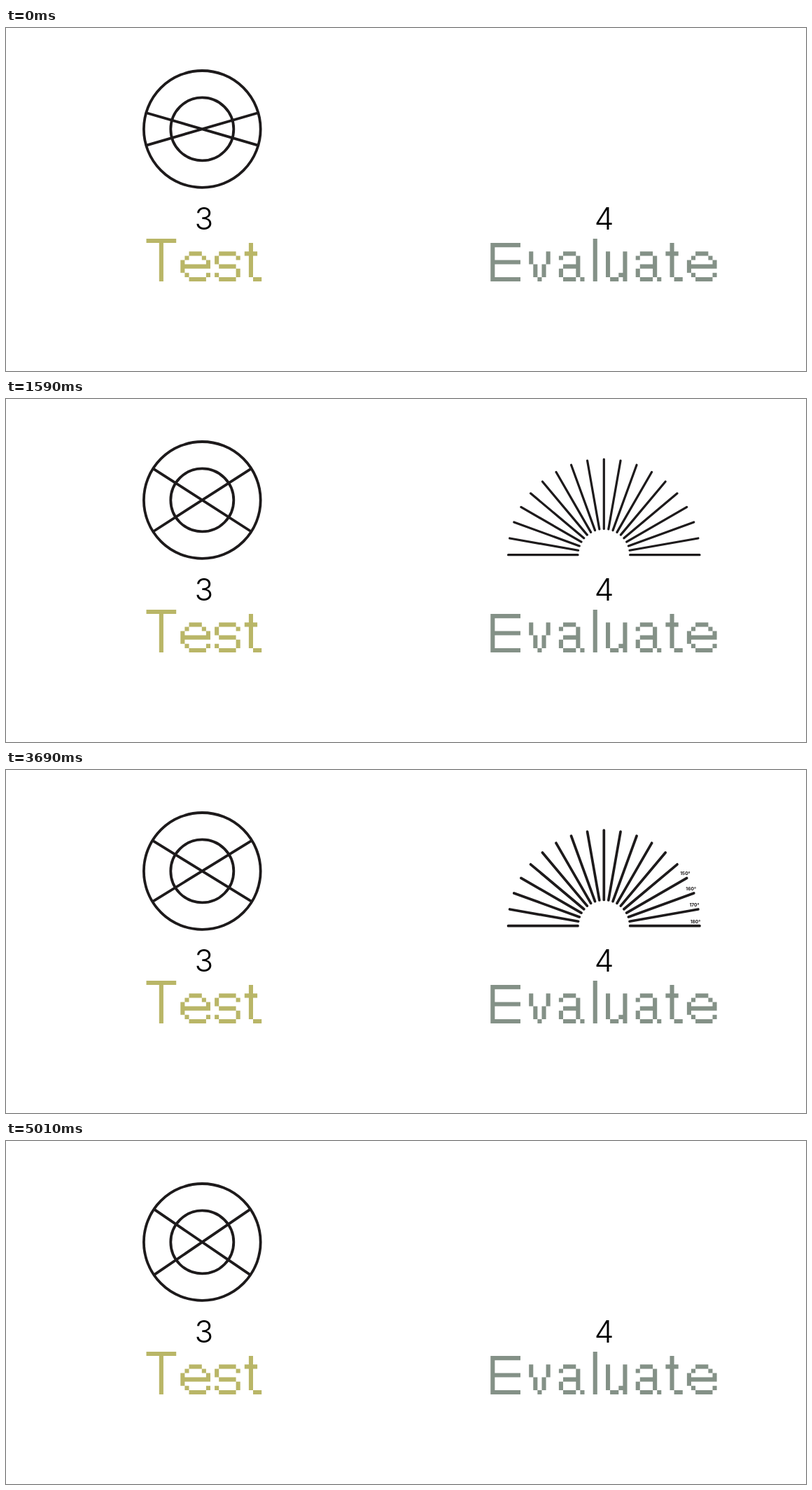
Write an HTML page that moves like this. It is 1143x490 px and loops after 5.13 s.

```html
<!DOCTYPE html>
<html lang="en">
<head>
<meta charset="utf-8">
<title>Test and Evaluate</title>
<style>
  html, body { margin: 0; width: 100%; height: 100%; overflow: hidden; background: #fff; }
  svg { display: block; width: 100%; height: 100%; }
  .ink { fill: none; stroke: #1d1a1b; stroke-width: 3.8; }
  .num { font: 300 44px Inter, "Liberation Sans", sans-serif; text-anchor: middle; fill: #000; }
  .deg { font: 700 6.6px Inter, "Open Sans", sans-serif; text-anchor: middle; fill: #1d1a1b; }
</style>
</head>
<body>
<svg id="stage" viewBox="0 0 1143 490">
  <g class="ink">
    <circle cx="280.3" cy="144.4" r="83.4"/>
    <circle cx="280.3" cy="144.4" r="45"/>
    <path id="cross"/>
  </g>
  <g id="rays" class="ink" stroke-linecap="round"></g>
  <g id="labels"></g>
  <text class="num" x="282.8" y="288">3</text>
  <text class="num" x="854.5" y="288">4</text>
</svg>
<script>
const LOOP = 5130, COUNT = 19, RAD = Math.PI / 180;
const $ = id => document.getElementById(id);

function add(parent, tag, attrs, text = '') {
  const el = document.createElementNS('http://www.w3.org/2000/svg', tag);
  for (const k in attrs) el.setAttribute(k, attrs[k]);
  el.textContent = text;
  parent.append(el);
  return el;
}

// Block letters: advance, then pen strokes through grid points written as xy.
const letters = {
  T: [8, '00 60, 30 39'],
  E: [9, '61 01 09 69, 05 65'],
  a: [8, '04 13 33 44 48 59, 46 16 07 08 19 39 48'],
  e: [8, '06 66 65 43 23 05 07 29 59 68'],
  l: [3, '00 09'],
  s: [7, '54 43 13 04 05 16 46 57 58 49 19 08'],
  t: [5, '11 18 29 39, 03 23'],
  u: [7, '03 08 19 29 38, 43 49'],
  v: [7, '03 05 16 18 29 38 36 45 43']
};

// Cells crossed by one stroke; every segment is straight or at 45 degrees.
function cells(stroke, pen) {
  const pts = stroke.split(' ').map(p => [+p[0], +p[1]]);
  let [x, y] = pts[0], d = '';
  const dot = () => { d += `M${pen + x} ${y}h1v1h-1z`; };
  dot();
  for (const [px, py] of pts) {
    while (x !== px || y !== py) {
      x += Math.sign(px - x);
      y += Math.sign(py - y);
      dot();
    }
  }
  return d;
}

function blockWord(word, x, color) {
  const g = add($('stage'), 'g', {
    transform: `translate(${x} 301) scale(6.1)`, fill: color,
    role: 'img', 'aria-label': word
  });
  let pen = 0, d = '';
  for (const ch of word) {
    const [advance, strokes] = letters[ch];
    for (const s of strokes.split(', ')) d += cells(s, pen);
    pen += advance;
    if (word.startsWith('t', word.indexOf(ch) + 1)) pen -= 1 * (ch === 'a');
  }
  add(g, 'path', { d });
}
// Kerned pair "at" sits one cell tighter.
function kern() {
  blockWord('Test', 200.5, '#b9b667');
  blockWord('Evalu', 692.3, '#849187');
  blockWord('a', 692.3 + 34 * 6.1, '#849187');
  blockWord('te', 692.3 + 41 * 6.1, '#849187');
}
kern();

const rays = [], labels = [];
for (let i = 0; i < COUNT; i++) {
  const c = -Math.cos(i * 10 * RAD), s = -Math.sin(i * 10 * RAD);
  const at = r => [854.3 + r * c, 222.7 + r * s];
  const [x1, y1] = at(37.3), [x2, y2] = at(136.7);
  rays.push(add($('rays'), 'line', { x1, y1, x2, y2 }));
  const shift = 2.5 - 8.5 * Math.max(0, c) ** 4;
  labels.push(add($('labels'), 'text',
    { class: 'deg', x: x2 + shift, y: y2 - 4 }, i * 10 + '°'));
}

const hold = (t, from, tick) => from + tick * Math.floor((t - from) / tick);

function sweep(t, t0, t1, a0, a1) {
  const p = Math.min(1, Math.max(0, (t - t0) / (t1 - t0)));
  return a0 + (a1 - a0) * p;
}

// Two steady turns of the crossed lines, in degrees.
function angleAt(t) {
  if (t >= 1830) return sweep(hold(t, 1830, 54), 1830, 4980, 50, 327.3);
  const q = t < 1170 ? hold(t, 120, 57) : hold(t, 1170, 140);
  return sweep(q, 120, 1590, 16.2, 147.3);
}

const show = (el, on) => el.setAttribute('visibility', on ? 'visible' : 'hidden');

function draw(t) {
  const a = angleAt(t) * RAD, x = 83 * Math.cos(a), y = 83 * Math.sin(a);
  $('cross').setAttribute('d',
    `M${280.3 - x} ${144.4 - y}l${2 * x} ${2 * y}M${280.3 - x} ${144.4 + y}l${2 * x} ${-2 * y}`);
  $('rays').style.strokeWidth = t >= 1830 && t < 3956 ? 3.7 : 3.2;
  for (let i = 0; i < COUNT; i++) {
    const back = COUNT - 1 - i;
    show(rays[i], t >= 120 + 57 * i && t < 3956 + 54 * back);
    show(labels[i], t >= 1870 + 56 * back && t < 2930 + 54 * i);
  }
}

let begin;
function frame(now) {
  begin ??= now;
  draw((now - begin) % LOOP);
  requestAnimationFrame(frame);
}
draw(0);
requestAnimationFrame(frame);
</script>
</body>
</html>
```
